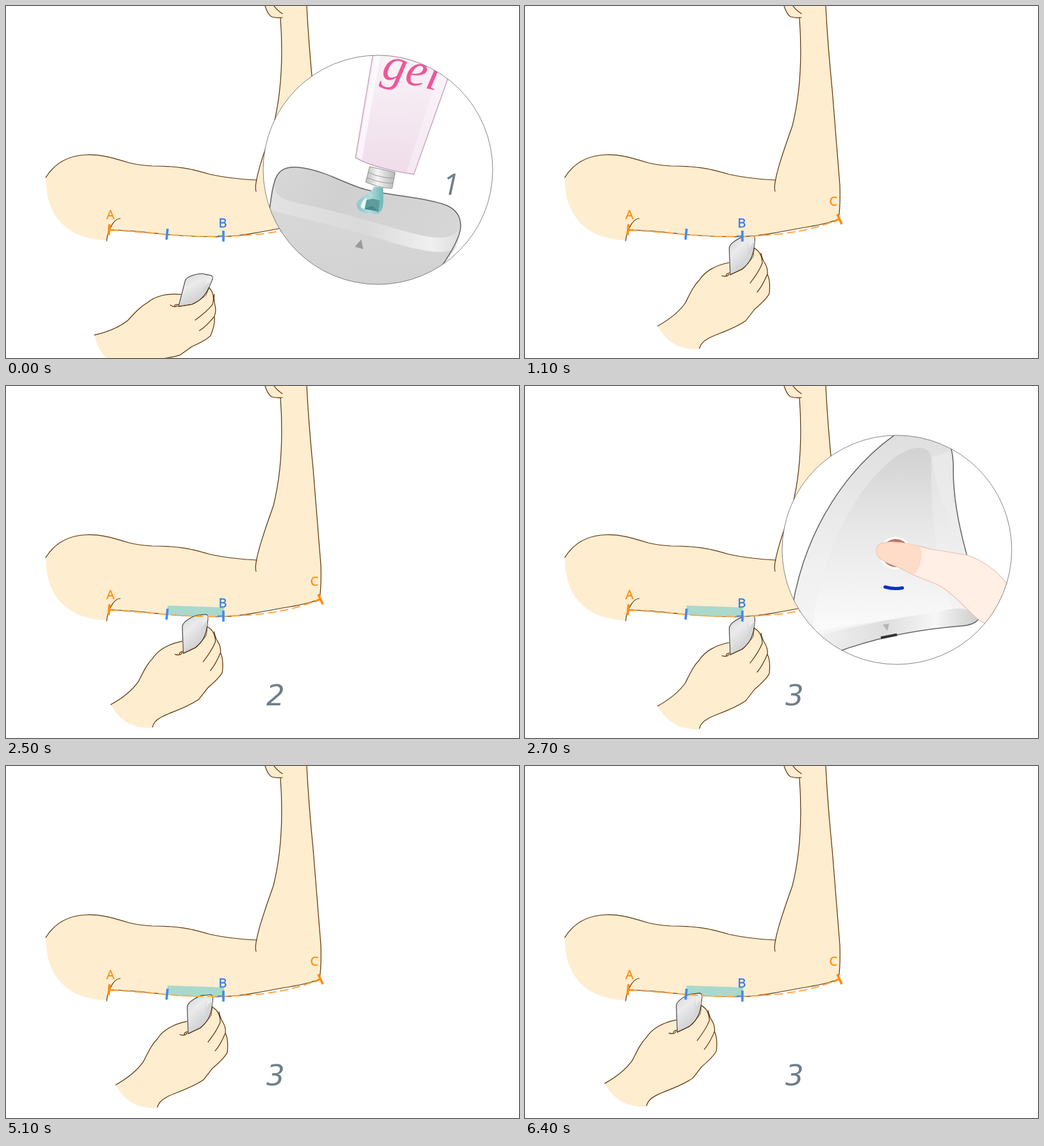
Recreate the animation shown at these times as an HTML page. Size 800 by 550 pixels, loop 6500 ms.

```html
<!DOCTYPE html>
<html lang="en">
<head>
<meta charset="utf-8">
<title>Gel application</title>
<style>
  html, body { margin: 0; width: 100%; height: 100%; overflow: hidden; background: #fff; }
  svg { display: block; width: 100%; height: 100%; }
  .skin { fill: #ffedd0; }
  .line { fill: none; stroke: #5c3206; stroke-width: 1.2; stroke-linejoin: round; stroke-linecap: round; }
  .edge { fill: none; stroke: #626466; stroke-width: 1.5; }
  .ring { fill: none; stroke: #666; stroke-width: .8; }
  .label { font: 20px "Open Sans", "Noto Sans", sans-serif; stroke-width: .4; }
  .digit { font: italic 45px "DejaVu Sans", sans-serif; fill: #6e7e87; }
  .one { font: italic 46px "Open Sans", sans-serif; }
  .gel { font: italic 74px "Liberation Serif", serif; fill: #ee5799; }
  .tick { fill: none; stroke-width: 3.6; }
  .orange { stroke: #ff8c0a; }
  .blue { stroke: #4189f0; }
</style>
</head>
<body>
<svg viewBox="0 0 800 550">
  <defs>
    <clipPath id="lens"><circle cx="580" cy="256" r="179"/></clipPath>
    <linearGradient id="device" x1="0" y1="0" x2=".6" y2="1">
      <stop stop-color="#d2d3d5"/><stop offset=".4" stop-color="#ebebec"/><stop offset="1" stop-color="#c6c7c9"/>
    </linearGradient>
    <linearGradient id="head" x1="0" y1="0" x2="1" y2=".4">
      <stop stop-color="#d8d8d8"/><stop offset=".4" stop-color="#d0d0d0"/><stop offset="1" stop-color="#d6d6d6"/>
    </linearGradient>
    <linearGradient id="front" x1="0" y1="0" x2=".2" y2="1">
      <stop stop-color="#d8d8d8"/><stop offset="1" stop-color="#d2d2d2"/>
    </linearGradient>
    <linearGradient id="lip">
      <stop stop-color="#e2e2e2"/><stop offset=".5" stop-color="#dadada"/><stop offset=".85" stop-color="#f0f0f0"/><stop offset="1" stop-color="#dcdcdc"/>
    </linearGradient>
    <linearGradient id="tube" x1="0" y1="0" x2="0" y2="1">
      <stop stop-color="#faf5f9"/><stop offset="1" stop-color="#efdcea"/>
    </linearGradient>
    <linearGradient id="nozzle">
      <stop stop-color="#bdbdbd"/><stop offset=".4" stop-color="#f5f5f5"/><stop offset="1" stop-color="#b5b5b5"/>
    </linearGradient>
    <linearGradient id="drop">
      <stop stop-color="#8cc6c7"/><stop offset=".5" stop-color="#b3dcdc"/><stop offset="1" stop-color="#6db5b5"/>
    </linearGradient>
    <linearGradient id="shell" x1="0" y1="0" x2="0" y2="1">
      <stop stop-color="#dedede"/><stop offset=".55" stop-color="#f0f0f0"/><stop offset="1" stop-color="#f6f6f6"/>
    </linearGradient>
    <linearGradient id="panel" x1="0" y1="0" x2="0" y2="1">
      <stop stop-color="#d2d2d2"/><stop offset=".45" stop-color="#e8e8e8"/><stop offset="1" stop-color="#fbfbfb"/>
    </linearGradient>
    <linearGradient id="rim">
      <stop stop-color="#f4f4f4"/><stop offset=".45" stop-color="#dedede"/><stop offset=".75" stop-color="#f6f6f6"/><stop offset="1" stop-color="#cccccc"/>
    </linearGradient>
  </defs>

  <!-- Arm -->
  <path class="skin" d="M404 0Q409 15 415 17Q422 19 428 18C432 75 430 135 417 187C407 216 398 244 391 272Q350 270 318 263C288 254 268 250 228 250Q208 249 192 245C160 235 146 232 127 232.500C100 233 77 244 62 268C62 325 92 364 157 366L162 350C195 350 220 354 251 357Q296 361 338 360.500C370 359 398 353 430 347Q470 341 489 333Q492 312 491 280L469 0Z"/>
  <g class="line">
    <path d="M404 0Q409 15 415 17Q422 19 431 18M418 0Q423 7 431 12M428 18C432 75 430 135 417 187C405 221 385 277 390 289.500"/>
    <path d="M391 272Q350 270 318 263C288 254 268 250 228 250Q208 249 192 245C160 235 146 232 127 232.500C100 233 77 244 62 268"/>
    <path d="M469 0Q472 60 479 130L491 280Q492 312 489 333Q470 341 430 347C398 353 370 359 338 360.500Q296 361 251 357C220 354 195 350 162 350M178 332Q170 332 163 346Q158 355 157 367"/>
  </g>
  <path id="strip" fill="#a9d9cc"/>

  <!-- Hand holding the device -->
  <g id="hand">
    <path class="skin" d="M207 500C225 490 240 478 250 464C258 448 263 437 272 428C280 415 297 405 318 401L320 420L339 411Q355 398 357 378C366 383 370 390 370 398Q379 407 378 419Q383 429 381 449C378 456 365 468 358 474L344 492C320 508 298 512 285 520Q274 526 272 536C240 538 220 524 207 500Z"/>
    <path d="M320 420L318.500 379Q318 373 329 366Q340 359 346 360L355 359Q359 360 358.500 365L356 391Q350 400 339 411Z" fill="url(#device)" stroke="#3e3d3d" stroke-width="1.100"/>
    <path d="M358 364Q349 364 348 373L347 398L339 410Q350 400 356 391Z" fill="#d5d6d8"/>
    <path d="M349 366Q352 361 358 361L357 370Q350 373 349 383Z" fill="#ececed"/>
    <path class="line" d="M207 500C225 490 240 478 250 464C258 448 263 437 272 428C280 415 297 405 318 401M307 421.500Q316 424 318 419M314 422Q313 418 319 417M320 420L339 411Q355 398 357 378C366 383 370 390 370 402Q365 415 351 433M368 386Q370 396 374 402Q379 410 378 419Q370 438 362 447M378 419Q383 429 381 449C378 456 365 468 358 474L344 492C320 508 298 512 285 520Q274 526 272 535"/>
  </g>

  <!-- Measuring line -->
  <path d="M162 350Q205 353 251 357C310 362 350 361 400 356Q455 349 489 333" fill="none" stroke="#ffa949" stroke-width="2" stroke-dasharray="13 6"/>
  <path class="tick orange" d="M161.500 341L160 358M487 325.500L494 341"/>
  <path class="tick orange" d="M161 350H169M481 337L490 333" style="stroke-width:2.500"/>
  <path class="tick blue" d="M252 348L250.300 365M339 351V368"/>
  <path class="tick blue" d="M330 359.500H339" style="stroke-width:2"/>
  <g class="label" fill="#ff8c0a" stroke="#ff8c0a">
    <text x="156.500" y="333">A</text><text x="474.500" y="312">C</text>
  </g>
  <text class="label" x="331.500" y="345.500" fill="#2d78e6" stroke="#2d78e6">B</text>

  <!-- Close-up: gel onto the device -->
  <g id="gelView">
    <circle cx="580" cy="256" r="179" fill="#fff"/>
    <g clip-path="url(#lens)">
      <path id="headShape" d="M410 330Q413 295 418 277C423 257 435 249 460 252.500C500 258 530 279 562 287C602 297 640 297 680 309C700 315 710 328 709 346Q707 367 677 410L640 450H420Z" fill="url(#head)"/>
      <path d="M412 318C440 326 500 336 545 350C600 368 650 388 690 384L704 374L677 410L640 450H400Z" fill="url(#front)"/>
      <path d="M419 280C420 300 435 303 460 309C530 323 590 344 650 359C690 367 706 357 709 342Q709 361 700 379C680 390 645 382 600 369C540 350 480 336 412 319Z" fill="url(#lip)"/>
      <use href="#headShape" style="display:none"/>
      <path class="edge" d="M410 330Q413 295 418 277C423 257 435 249 460 252.500C500 258 530 279 562 287C602 297 640 297 680 309C700 315 710 328 709 346Q707 367 677 410"/>
      <path d="M554 365L557 380L544 376Z" fill="#999"/>
      <path d="M574 282C570 294 548 298 547 311C548 325 566 324 574 325C592 325 588 304 588 284Z" fill="url(#drop)"/>
      <path d="M558 304L572 301L583 304L581 321L558 317Z" fill="#5d9d9d"/>
      <path d="M558 317L571 312L581 321Z" fill="#478b8b"/>
      <path d="M553 314Q554 304 563 299L559 318Z" fill="#e8f7f7"/>
      <path d="M567 251L607 260L602 285Q580 284 561 275Z" fill="url(#nozzle)" stroke="#909090"/>
      <path d="M565 260Q585 269 605 269M563 268Q583 277 603 277" fill="none" stroke="#9b9b9b"/>
      <path d="M575 60L545 237Q575 254 636 263L708 60Z" fill="url(#tube)" stroke="#c8a8c0" stroke-width="1.500"/>
      <path d="M576 75L547 236L555 241L584 75Z" fill="#fff" opacity=".65"/>
      <path d="M688 112L636 262L624 260L676 100Z" fill="#fff" opacity=".3"/>
      <text class="gel" transform="translate(584 112) rotate(13)">gel</text>
    </g>
    <circle class="ring" cx="580" cy="256" r="179"/>
    <text class="digit one" x="681" y="295">1</text>
  </g>

  <!-- Close-up: pressing the button -->
  <g id="pressView">
    <circle cx="580" cy="256" r="179" fill="#fff"/>
    <g clip-path="url(#lens)">
      <path d="M580 74C505 126 438 220 417 345L400 440L494 413Q578 383 680 375Q699 374 707 365L689 263Q667 185 668 128Q668 105 662 90L640 70Z" fill="url(#shell)"/>
      <path d="M448 385C455 290 500 175 572 115C600 93 632 88 634 115C632 200 642 290 668 350Q560 363 448 385Z" fill="url(#panel)"/>
      <path d="M634 112Q646 190 689 264L667 180L666 100Z" fill="#eee" opacity=".6"/>
      <path d="M440 396C520 370 610 360 668 348Q690 345 700 358L707 365Q699 374 680 375Q578 383 494 413L440 430Z" fill="url(#rim)"/>
      <path class="edge" d="M580 74C505 126 438 220 417 345M494 413Q578 383 680 375Q699 374 707 365M662 90Q668 105 668 128Q667 185 689 264"/>
      <path d="M558 373L568 371L565 383Z" fill="#b5b5b5"/>
      <path d="M555 393.500L580 388.500" stroke="#333" stroke-width="4"/>
      <path d="M561.500 314Q575 318 588.500 315.500" fill="none" stroke="#0a32bd" stroke-width="5" stroke-linecap="round"/>
      <circle cx="578" cy="261" r="25.500" fill="#fff"/>
      <circle cx="578" cy="261" r="22" fill="#bd7667"/>
      <path d="M548 258C547 247 558 243 576 244C602 245 615 251 634 255L688 264Q724 275 752 309L775 350L730 385L717 371C695 360 675 329 650 314C630 303 612 300 596 290C573 277 549 275 548 258Z" fill="#ffefe5" stroke="#efbfab" stroke-width="1.200"/>
      <path d="M548.600 258C548 248 558 244 576 244.600C596 245 609 249 616 252C622 267 617 285 606 295L596 289.500C573 276 549 274 548.600 258Z" fill="#ffdcc8"/>
    </g>
    <circle class="ring" cx="580" cy="256" r="179"/>
  </g>
  <text class="digit" id="step" x="406" y="498.500"></text>
</svg>
<script>
  const LOOP = 6500, TICK = 100;
  const el = id => document.getElementById(id);
  const show = (id, on) => el(id).setAttribute("visibility", on ? "visible" : "hidden");

  // Linear value between [time, value] keys.
  function track(keys, t) {
    const i = keys.findIndex(([time]) => time > t);
    if (i < 0) return keys[keys.length - 1][1];
    if (i === 0) return keys[0][1];
    const [t0, v0] = keys[i - 1], [t1, v1] = keys[i];
    return v0 + (v1 - v0) * (t - t0) / (t1 - t0);
  }

  const LOWERED = [[800, 1], [1100, 0]];
  const SLIDE = [[1500, 0], [2300, -87], [2700, 0], [4100, 0], [6400, -82.5]];
  const SPREAD = [[1500, 338], [2300, 251]];

  function draw(now) {
    const t = Math.floor(now % LOOP / TICK) * TICK;
    const low = track(LOWERED, t), dx = track(SLIDE, t), left = track(SPREAD, t);
    const tilt = (left - 251) * .03;

    el("hand").setAttribute("transform",
      `translate(${dx - 51 * low} ${dx * .05 + 49.5 * low}) rotate(${16.5 * low} 320 420)`);
    el("strip").setAttribute("d",
      `M${left + 1} ${343 + tilt}L340.500 346L339 360.500Q${(left + 339) / 2} 361 ${left} ${357.5 + tilt}Z`);
    show("strip", t >= 1500);
    show("gelView", t < 800);
    show("pressView", t >= 2700 && t < 4100);
    el("step").textContent = t < 1500 ? "" : t < 2700 ? "2" : "3";
  }

  function frame() {
    draw(performance.now());
    requestAnimationFrame(frame);
  }
  frame();
</script>
</body>
</html>
```
